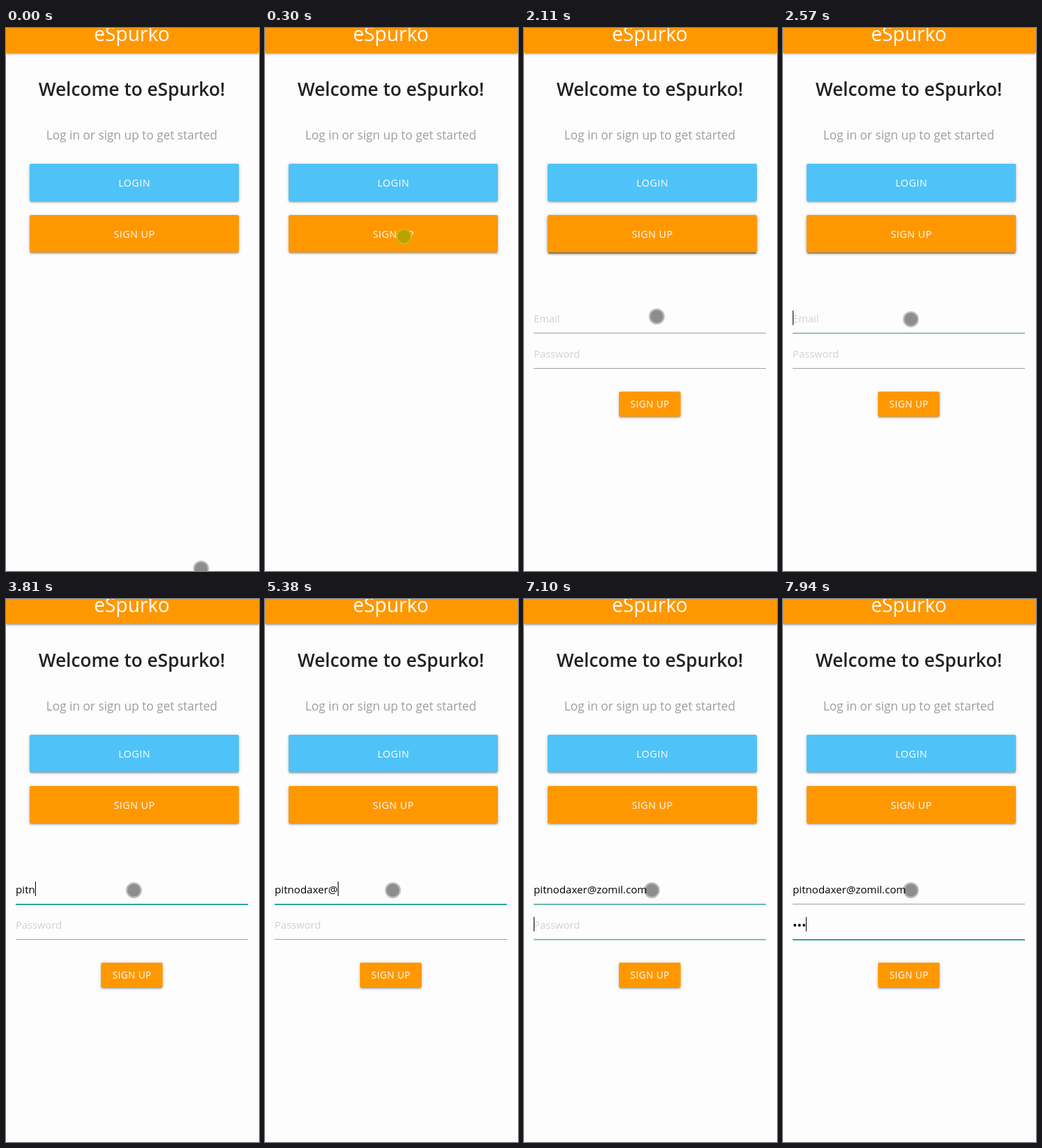
Recreate the animation shown at these times as an HTML page. Size 365 by 784 pixels, loop 8000 ms.

```html
<!DOCTYPE html>
<html lang="en">
<head>
<meta charset="utf-8">
<title>Sign up</title>
<style>
  html, body { margin: 0; width: 100%; height: 100%; overflow: hidden; background: #fdfdfd; }
  #stage { position: absolute; left: 0; top: 0; width: 365px; height: 784px; overflow: hidden; }
  #stage div, svg { position: absolute; }
  .raised {
    box-shadow: 0 2px 2px 0 rgba(0,0,0,.14), 0 3px 1px -2px rgba(0,0,0,.12), 0 1px 5px 0 rgba(0,0,0,.2);
  }
  .orange { background: #ff9800; }
  .btn { border-radius: 2px; }
  .large { left: 34px; width: 302px; height: 54px; }
  #nav { left: 0; top: -20px; width: 365px; height: 56px; }
  #login { top: 196px; background: #4fc3f7; }
  #signup, #hover { top: 270px; }
  #hover {
    box-shadow: 0 3px 3px 0 rgba(0,0,0,.14), 0 1px 7px 0 rgba(0,0,0,.12), 0 3px 1px -1px rgba(0,0,0,.2);
  }
  #send { left: 137px; top: 525px; width: 89px; height: 36px; }
  svg { left: 0; top: 0; }
  text { font-family: "Open Sans", "Noto Sans", sans-serif; white-space: pre; }
  .mid { text-anchor: middle; }
  .label { font-size: 14.35px; letter-spacing: .5px; fill: #fff; }
  .small { font-size: 13.6px; }
  .hint { font-size: 14.8px; fill: #d1d1d1; }
  .value { font-size: 15.2px; fill: #000; }
  .dots { font-size: 17.2px; }
  .rule { fill: #9e9e9e; }
  .active { fill: #26a69a; }
</style>
</head>
<body>
<div id="stage">
  <div id="nav" class="orange raised"></div>
  <div id="login" class="btn large raised"></div>
  <div id="hover" class="btn large"></div>
  <div id="signup" class="btn large orange raised"></div>
  <div id="send" class="btn orange raised"></div>
  <svg width="365" height="784" viewBox="0 0 365 784">
    <text class="mid" x="181.5" y="19" font-size="28.3" fill="#fff">eSpurko</text>
    <text class="mid" x="181.5" y="98" font-size="26.4" font-weight="600" fill="#212121">Welcome to eSpurko!</text>
    <text class="mid" x="181.5" y="161" font-size="17.36" fill="#9e9e9e">Log in or sign up to get started</text>
    <text class="mid label" x="185.2" y="229">LOGIN</text>
    <text class="mid label" x="185.2" y="303">SIGN UP</text>
    <g id="form">
      <text id="emailHint" class="hint" x="14" y="425">Email</text>
      <text id="email" class="value" x="14" y="425"></text>
      <rect class="rule" x="14" y="440" width="335" height="1"/>
      <rect id="emailRule" class="active" x="14" y="440" width="335" height="2"/>
      <text id="passHint" class="hint" x="14" y="476">Password</text>
      <text id="pass" class="value dots" x="14" y="477"></text>
      <rect class="rule" x="14" y="491" width="335" height="1"/>
      <rect id="passRule" class="active" x="14" y="491" width="335" height="2"/>
      <text class="mid label small" x="181.8" y="548">SIGN UP</text>
      <rect id="caret" width="1" height="21"/>
    </g>
    <g id="cursor">
      <circle id="ring" r="11.5"/>
      <circle id="core" r="9.3"/>
    </g>
  </svg>
</div>
<script>
const LOOP = 8000;
const SHOW_FORM = 1720, FOCUS_EMAIL = 2500, FOCUS_PASS = 7000;
const ADDRESS = "pitnodaxer@zomil.com";
const emailKeys = [3200, 3350, 3430, 3810, 3890, 4040, 4440, 4510, 4760, 4830, 5230,
  5700, 5850, 5930, 6000, 6170, 6400, 6550, 6630, 6700];
const passKeys = [7710, 7790, 7940];
const caretOff = [[3030, 3200], [7480, 7710]];

// time, x, y: the pointer holds each place until the next
const pointer = [
  [0, 281.5, 780.5], [70, 274, 690], [150, 244, 490], [230, 211, 345], [300, 200.5, 301],
  [1960, 200.5, 318], [2030, 200, 356], [2110, 191.5, 416.5], [2190, 187, 440],
  [2270, 185, 444], [2350, 184.5, 430], [2420, 184.5, 420.5]
];

const $ = id => document.getElementById(id);
const ramp = (t, start, length) => Math.min(1, Math.max(0, (t - start) / length));
const typed = (keys, t) => keys.filter(k => k <= t).length;
const show = (node, on) => { node.style.visibility = on ? "visible" : "hidden"; };

function drawForm(t) {
  const visible = t >= SHOW_FORM;
  $("form").style.display = visible ? "" : "none";
  show($("send"), visible);
  if (!visible) return;

  $("email").textContent = ADDRESS.slice(0, typed(emailKeys, t));
  $("pass").textContent = "•".repeat(typed(passKeys, t));
  show($("emailHint"), t < emailKeys[0]);
  show($("passHint"), t < passKeys[0]);

  const toPass = ramp(t, FOCUS_PASS, 250);
  $("emailRule").style.opacity = ramp(t, FOCUS_EMAIL, 220) * (1 - toPass);
  $("passRule").style.opacity = toPass;

  const inPass = t >= FOCUS_PASS + 20;
  const field = $(inPass ? "pass" : "email");
  const width = field.textContent ? field.getComputedTextLength() : 0;
  $("caret").setAttribute("x", Math.round(14 + width));
  $("caret").setAttribute("y", inPass ? 459 : 408);
  const blinkedOff = caretOff.some(([from, to]) => t >= from && t < to);
  $("caret").style.opacity = t >= FOCUS_EMAIL && !blinkedOff ? 1 : 0;
}

function drawPointer(t) {
  const [, x, y] = pointer.filter(p => p[0] <= t).pop();
  const onOrange = y > 270 && y < 324;
  $("cursor").setAttribute("transform", `translate(${x} ${y})`);
  $("ring").setAttribute("fill", onOrange ? "#d2b619" : "rgba(0,0,0,.25)");
  $("core").setAttribute("fill", onOrange ? "#b9a200" : "rgba(0,0,0,.25)");
}

function draw(t) {
  drawForm(t);
  drawPointer(t);
  $("hover").style.opacity = ramp(t, 1630, 160) * (1 - ramp(t, FOCUS_EMAIL, 200));
}

const start = performance.now();
function tick() {
  draw((performance.now() - start) % LOOP);
  requestAnimationFrame(tick);
}
tick();
</script>
</body>
</html>
```
